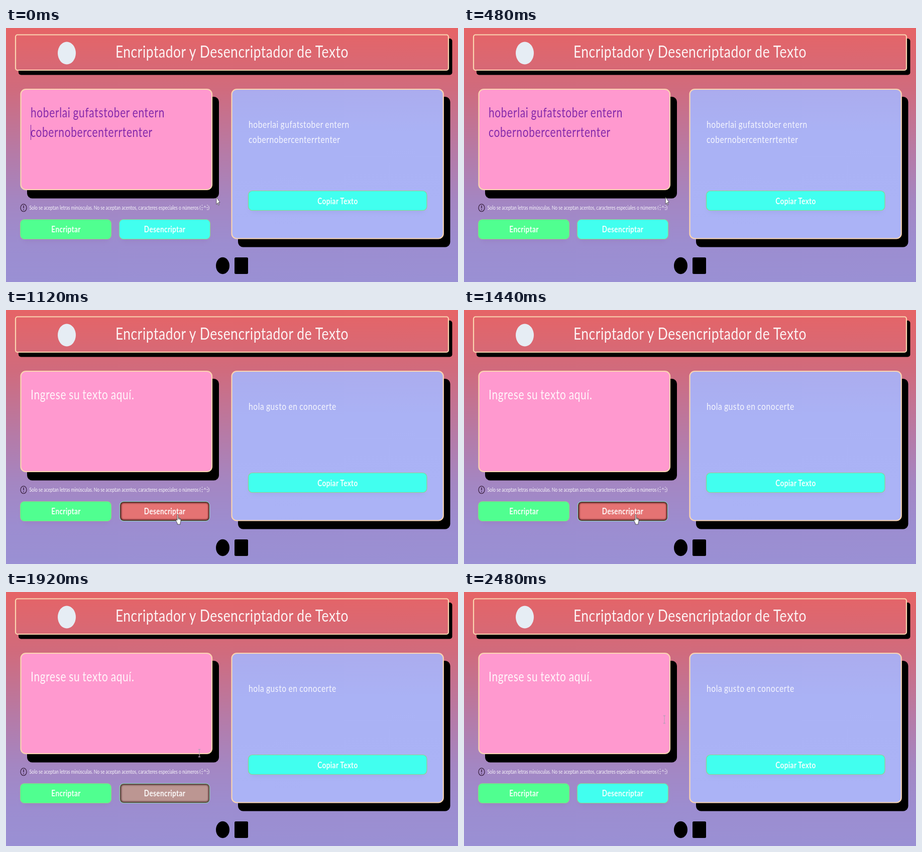
An HTML page for the animation above (2560 ms loop, 900 by 506 pixels).

```html
<!DOCTYPE html>
<html lang="es">
<head>
<meta charset="utf-8">
<title>Encriptador y Desencriptador de Texto</title>
<style>
  html, body { margin: 0; width: 100%; height: 100%; overflow: hidden; background: #9b8fd3; }
  svg { display: block; width: 100vw; height: 100vh; }
  text { font-family: Lato, "Open Sans", sans-serif; fill: #fff; white-space: pre; }
  .title { font-size: 33px; letter-spacing: .7px; text-anchor: middle; fill-opacity: .92; }
  .input { font-size: 26px; letter-spacing: .9px; word-spacing: -1.3px; fill-opacity: .92; }
  .output { font-size: 19.5px; letter-spacing: .7px; word-spacing: -1px; fill-opacity: .88; }
  .label { font-size: 17px; font-weight: 700; letter-spacing: .45px; text-anchor: middle; fill-opacity: .95; }
  .note { font-size: 10.8px; letter-spacing: -.06px; fill-opacity: .92; }
  .typed { fill: #7a1fa8; }
  .frame { stroke: #fbd5b0; stroke-width: 2.2; }
  .btn { stroke: #92cf88; stroke-width: 1.2; }
</style>
</head>
<body>
<svg viewBox="0 0 900 506" preserveAspectRatio="none">
  <defs>
    <linearGradient id="sky" gradientUnits="userSpaceOnUse" x1="0" y1="0" x2="0" y2="506">
      <stop offset="0" stop-color="#e66466"/>
      <stop offset=".24" stop-color="#d06b7d"/>
      <stop offset=".5" stop-color="#b57ba8"/>
      <stop offset=".68" stop-color="#a486c2"/>
      <stop offset=".85" stop-color="#9c8dd0"/>
      <stop offset="1" stop-color="#9a90d4"/>
    </linearGradient>
    <linearGradient id="panel" x1="0" y1="0" x2="0" y2="1">
      <stop offset="0" stop-color="#abacee"/>
      <stop offset=".3" stop-color="#aab2f5"/>
      <stop offset="1" stop-color="#abb3f6"/>
    </linearGradient>
    <filter id="soft" x="-10%" y="-40%" width="120%" height="180%"><feGaussianBlur stdDeviation="4"/></filter>
    <filter id="edge" x="-10%" y="-40%" width="120%" height="180%"><feGaussianBlur stdDeviation="1.8"/></filter>
    <clipPath id="btnClip"><rect x="227" y="382" width="178.5" height="38" rx="7"/></clipPath>
  </defs>

  <rect width="900" height="506" fill="url(#sky)"/>

  <!-- header -->
  <rect x="25" y="21" width="863.5" height="72.5" rx="5"/>
  <rect class="frame" x="19" y="13.5" width="862" height="70.5" rx="4" fill="url(#sky)"/>
  <ellipse cx="121" cy="50" rx="18" ry="22.5" fill="#e6edf4"/>

  <!-- input and output panels -->
  <rect x="42" y="137" width="382" height="202.5" rx="10"/>
  <rect class="frame" x="29.5" y="122" width="380.5" height="200" rx="10" fill="#ff99cf"/>
  <rect x="462" y="137" width="422.5" height="299.5" rx="10"/>
  <rect class="frame" x="449.5" y="122" width="421.3" height="297.5" rx="10" fill="url(#panel)"/>

  <!-- note icon and face -->
  <g fill="none" stroke="#3a2140">
    <ellipse cx="35" cy="358.3" rx="6" ry="7.4" stroke-width="1.3"/>
    <path d="M35 353.5v5.8M35 361.3v1.7" stroke-width="1.5"/>
  </g>
  <path d="M387 354q-2.5 4 0 8.5M403.3 354q2.5 4 0 8.5M394 358l2-3.5 2 3.5M389 357.5h3M399.5 357.5h3M390.5 352v2M390.5 360v3M401 352v2M401 360v3" fill="none" stroke="#fff" stroke-width=".9" opacity=".85"/>

  <!-- buttons -->
  <g fill="#8a5a92" filter="url(#soft)" opacity=".14">
    <rect x="32" y="389" width="174" height="37" rx="8"/>
    <rect id="drop" x="229" y="389" width="174" height="37" rx="8"/>
  </g>
  <rect x="486" y="332" width="348" height="36" rx="8" fill="#6f70b8" filter="url(#soft)" opacity=".12"/>
  <rect class="btn" x="28.5" y="381.5" width="181" height="39" rx="8" fill="#50ff90"/>
  <rect class="btn" x="482.5" y="324.5" width="355.5" height="39" rx="8" fill="#41ffef"/>
  <rect class="btn" id="decode" rx="8"/>
  <g clip-path="url(#btnClip)">
    <rect id="inset" x="227" y="382" width="178.5" height="38" rx="7" fill="none" stroke="#2a1010" stroke-width="5" filter="url(#edge)"/>
  </g>
  <rect id="rim" x="226.5" y="381.5" width="179" height="39" rx="7.5" fill="none" stroke="#8fe0cf"/>

  <!-- footer links -->
  <ellipse cx="431.5" cy="473.5" rx="13.5" ry="16.7"/>
  <rect x="455" y="457" width="27" height="33" rx="2.5"/>

  <g id="fixed"></g>
  <g id="before"></g>
  <g id="after"></g>
  <path id="caret" d="M49.5 193v30" stroke="#7a1fa8"/>

  <!-- pointers, hot spot at 0,0 -->
  <g id="pointer">
    <path id="arrow" d="M0 0V14.5L3.2 11.4 5.2 16.2 7 15.2 5 10.6H8.7Z" fill="#fff" stroke="#333" stroke-width=".8"/>
    <g id="hand" stroke="#333" stroke-width=".9" stroke-linejoin="round">
      <path d="M-1.4 1.2Q0 -.8 1.3 1.2V7.3L3.5 7.6 5.5 8.2 7.5 9V14L6.3 17V20H-1V18L-4 13.5V10.3Q-2.6 9.8-1.4 12Z" fill="#fff"/>
      <path d="M1.3 7.3v3M3.5 7.6v3M5.5 8.2v3" fill="none"/>
    </g>
    <path id="beam" d="M-2.6 -7.5H-.8L0 -6.8.8 -7.5H2.6M0 -6.8V6.8M-2.6 7.5H-.8L0 6.8.8 7.5H2.6" fill="none" stroke="#b79fb6" stroke-width="1.3"/>
  </g>
</svg>
<script>
const LOOP = 2560, STEP = 80, SQUEEZE = .8;
const CLICK = 1040, ENTER = 800, LEAVE = 1840, FADE = 320;
// pointer path: time, x, y
const PATH = [
  [0, 419, 337], [160, 419, 337], [400, 402, 336], [520, 401, 337],
  [800, 342, 407], [1600, 342, 407], [1760, 371, 388],
  [2080, 399, 254], [LOOP, 399, 254]
];
const $ = id => document.getElementById(id);
const clamp = v => Math.max(0, Math.min(1, v));
const mix = (a, b, k) => a + (b - a) * k;
const smooth = k => k * k * (3 - 2 * k);
const show = (id, on) => $(id).setAttribute('visibility', on ? 'visible' : 'hidden');

function set(id, attrs) {
  for (const key in attrs) $(id).setAttribute(key, attrs[key]);
}

function write(parent, kind, x, y, str) {
  const el = document.createElementNS('http://www.w3.org/2000/svg', 'text');
  el.setAttribute('class', kind);
  el.setAttribute('transform', `translate(${x} ${y}) scale(${SQUEEZE} 1)`);
  el.textContent = str;
  $(parent).append(el);
}

write('fixed', 'title', 450, 58.5, 'Encriptador y Desencriptador de Texto');
write('fixed', 'note', 46.5, 361.8, 'Solo se aceptan letras minúsculas. No se aceptan acentos, caracteres especiales o números');
write('fixed', 'label', 119.5, 407, 'Encriptar');
write('fixed', 'label', 316, 407, 'Desencriptar');
write('fixed', 'label', 660.5, 351, 'Copiar Texto');

['hoberlai gufatstober entern', 'cobernobercenterrtenter'].forEach((line, i) => {
  write('before', 'input typed', 49, 178 + 39 * i, line);
  write('before', 'output', 483, 199 + 30 * i, line);
});
write('after', 'input', 49, 178, 'Ingrese su texto aquí.');
write('after', 'output', 483, 199, 'hola gusto en conocerte');

function pointerAt(t) {
  const i = PATH.findIndex(p => p[0] > t);
  const [t0, x0, y0] = PATH[i - 1], [t1, x1, y1] = PATH[i];
  const k = smooth((t - t0) / (t1 - t0));
  return [mix(x0, x1, k), mix(y0, y1, k)];
}

function draw(t) {
  const clicked = t >= CLICK;
  show('before', !clicked);
  show('after', clicked);
  show('caret', t < 400);

  const hover = clamp((t - ENTER) / FADE) - clamp((t - LEAVE) / FADE);
  const depth = Math.sqrt(hover);
  const rgb = [[65, 229], [255, 115], [239, 115]].map(([a, b]) => Math.round(mix(a, b, hover)));
  set('decode', {
    x: 225.5 + depth, y: 381.5 + depth / 2,
    width: 181 - 2 * depth, height: 39 - depth,
    fill: `rgb(${rgb})`
  });
  set('inset', { opacity: depth * .85 });
  set('rim', { opacity: hover });
  set('drop', { opacity: 1 - hover });

  const [x, y] = pointerAt(t);
  const onButton = x > 225 && x < 407 && y > 381 && y < 421;
  const onInput = x < 411 && y < 323;
  set('pointer', { transform: `translate(${x} ${y}) scale(${SQUEEZE} 1)` });
  show('hand', onButton);
  show('beam', onInput);
  show('arrow', !onButton && !onInput);
}

const start = performance.now();
function tick() {
  const t = (performance.now() - start) % LOOP;
  draw(Math.floor(t / STEP) * STEP);
  requestAnimationFrame(tick);
}
draw(0);
requestAnimationFrame(tick);
</script>
</body>
</html>
```
